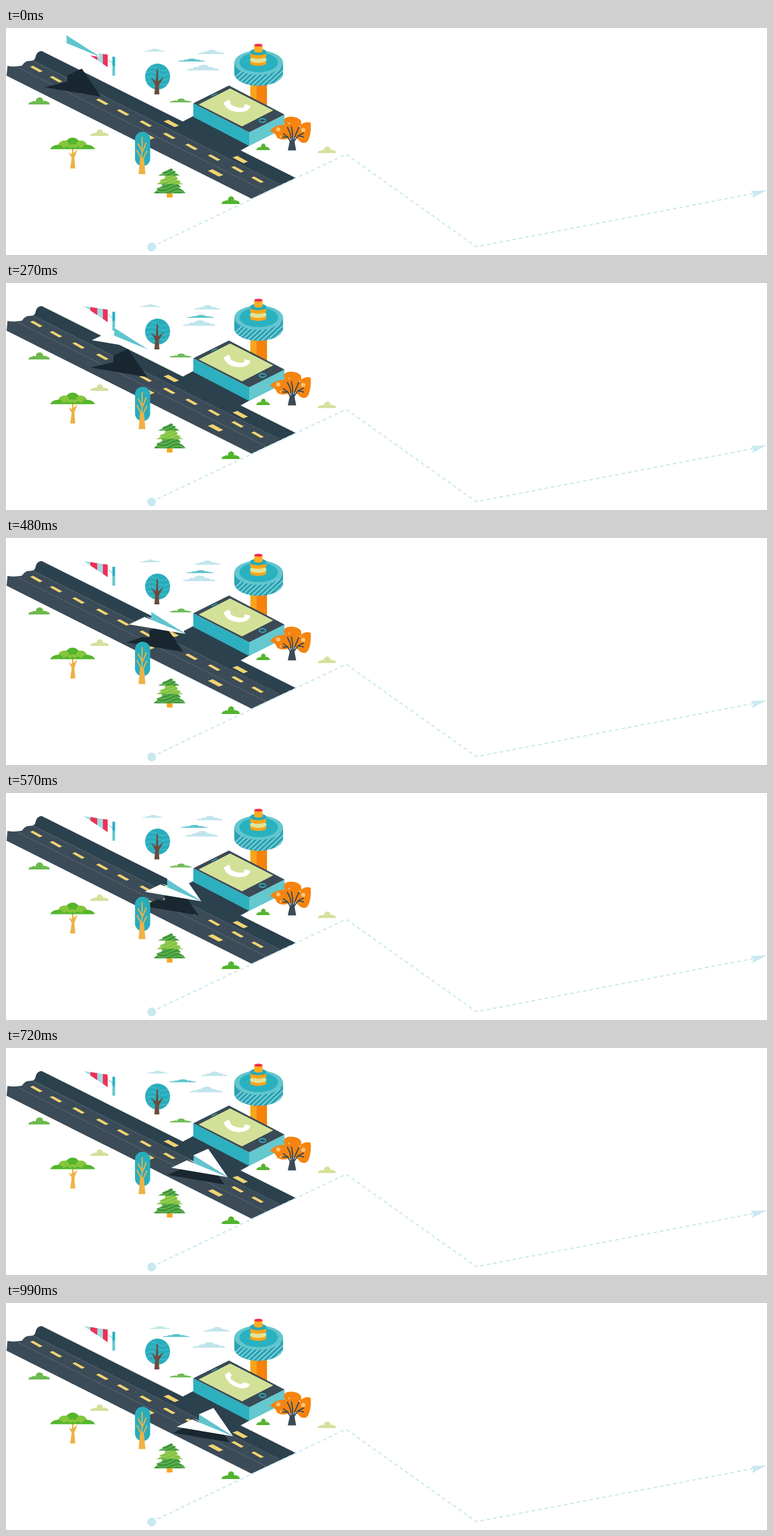
Recreate the animation shown at these times as an HTML page. Size 1280x383 px, loop 1.02 s.

```html
<!DOCTYPE html>
<html lang="en">
<head>
<meta charset="utf-8">
<title>Landing</title>
<style>
html, body { margin: 0; width: 100%; height: 100%; overflow: hidden; background: #fff; }
svg { display: block; width: 1280px; height: 383px; }
</style>
</head>
<body>
<svg viewBox="0 0 1280 383">
  <defs>
    <clipPath id="saucer"><path d="M384 58V77A41 20.5 0 0 0 466 77V58A41 20.5 0 0 1 384 58Z"/></clipPath>
    <clipPath id="phoneSide"><path d="M315 127L409 176V199L315 150Z"/></clipPath>
    <clipPath id="ball"><ellipse cx="255" cy="82" rx="21" ry="22"/></clipPath>
    <clipPath id="pine"><path d="M277 237L292 249H256ZM268 249H285L299 263H253ZM262 263H289L302 279H248Z"/></clipPath>
  </defs>

  <!-- windsock -->
  <g>
    <path d="M171 53L180 60M176 57L180 59" stroke="#64c8cf" fill="none"/>
    <path d="M131 39L171 45V66Z" fill="#9fdbe2"/>
    <path d="M142 40.6L153.5 42.4V54.3L142 46.5ZM163 43.8L171 45V66L163 60.5Z" fill="#ef3158"/>
    <path d="M179 48.5H183.5V64H179Z" fill="#2ab1c0"/>
    <path d="M179 64H183.5V80.5H179Z" fill="#64c8cf"/>
  </g>

  <g id="clouds"></g>

  <!-- round tree -->
  <ellipse cx="255" cy="82" rx="21" ry="22" fill="#28adbd"/>
  <g id="ballLines" clip-path="url(#ball)" fill="none" stroke="#5fc6d0" stroke-width=".9"></g>
  <path d="M249.5 112L251 96L244 84L252 90L253.5 69L255.5 69L256 90L265 83L257 97L258 112Z" fill="#6b4c3f"/>

  <g id="bushes"></g>

  <!-- flat tree -->
  <path d="M108 237L110.5 219L105.5 210L111 213L111 204H113.5V211L120 205L115 219L116.5 237Z" fill="#eeb144"/>
  <path d="M74 204.5Q78 197 88 197Q91 189 102 190Q106 185 112 185Q118 185 122 190Q133 189 136 197Q146 197 150 204.5Z" fill="#55b52c"/>
  <path d="M88 197Q91 189 101 190Q107 193 106 198Q112 194 118 198Q117 193 123 190Q133 189 136 197Q130 197 127 203Q121 197 116 203Q112 198 108 203Q103 197 97 203Q94 197 88 197Z" fill="#86c63c"/>
  <path d="M105 192Q107 185 112 185Q117 185 119 192Q115 196 112 193Q109 196 105 192Z" fill="#55b52c"/>

  <!-- pine -->
  <path d="M270.5 278H280V286H270.5Z" fill="#f5a623"/>
  <path d="M277 237L281 238L280 240.5L286 242L284 244L292 249H256L264 245L262 244L272 240Z" fill="#3f9a37"/>
  <path d="M268 249H285L289 254L287 256L294 259L292 261L299 263.5H253L261 259L258 257L267 254Z" fill="#85c440"/>
  <path d="M262 263H289L294 268L291 270L298 274L302 279H248L255 273L253 271L263 267Z" fill="#3f9a37"/>
  <g id="pineLines" clip-path="url(#pine)" fill="none" stroke="#b5dba0" stroke-width=".7"></g>

  <!-- road -->
  <path d="M1 80.5L2.5 64Q14 66 27 63.5Q32 55 40 55.5Q49 56 50 48Q52 39.5 60 39L487 253L413 288Z" fill="#3b4b57"/>
  <path d="M46 55Q50 53 50 48Q52 39.5 60 39L487 253L461 265Z" fill="#2c414e"/>
  <path d="M297 158L318 147L410 198L392 208Z" fill="#2c414e"/>
  <path d="M47 56L461 264M21 67L438 276" stroke="#98a1a6" stroke-width=".8" stroke-dasharray="1.6 1.8"/>
  <g id="marks" fill="#f0d372"></g>

  <!-- route -->
  <path d="M245 369L572 213L791 369L1256 279.5" fill="none" stroke="#c5e8ee" stroke-width="2" stroke-dasharray="6 5"/>
  <circle cx="245" cy="369.5" r="7.5" fill="#c9e9f0"/>
  <path d="M1253 275L1279 274L1255 287L1257 280Z" fill="#c9e9f0"/>

  <!-- tower -->
  <path d="M411 88H422V132H411Z" fill="#f9a51a"/>
  <path d="M421.5 88H439V132H421.5Z" fill="#f5820d"/>
  <path d="M384 58V77A41 20.5 0 0 0 466 77V58Z" fill="#2aa3b5"/>
  <g id="saucerLines" clip-path="url(#saucer)" stroke="#8fd6dc" stroke-width="1.8"></g>
  <ellipse cx="425" cy="58.5" rx="41" ry="20.5" fill="#62c6ce"/>
  <ellipse cx="425" cy="58" rx="32.5" ry="16.5" fill="#2ab1c0"/>
  <g id="drums"></g>
  <path d="M417.5 29V39A7 2.5 0 0 0 431.5 39V29Z" fill="#fbb020"/>
  <ellipse cx="424.5" cy="29" rx="7" ry="2.6" fill="#ee2f55"/>

  <!-- phone -->
  <path d="M315 127L409 176V199L315 150Z" fill="#2fb3c2"/>
  <g id="phoneLines" clip-path="url(#phoneSide)" stroke="#27a6b6" stroke-width=".7"></g>
  <path d="M409 176L468.5 146V169L409 199Z" fill="#64c8cf"/>
  <path d="M315 127L375 97L468.5 146L409 176Z" fill="#3a4a56"/>
  <path d="M324 129L377 102L449.5 139L397 166Z" fill="#d3e198"/>
  <path d="M345.5 115L355 110.3" stroke="#2ab1c1" stroke-width="1.5"/>
  <ellipse cx="431.5" cy="156" rx="5.5" ry="3" fill="none" stroke="#2fb3c3" stroke-width="1.8"/>
  <path id="handset" fill="#fff"/>

  <!-- orange tree -->
  <path d="M444 174Q452 163 469 163Q464 153 474 150Q488 148 496 156L497 163Q503 157 512.5 160Q514 178 508 190Q503 197 495 192L487 184L474 187Q463 190 456 185Q454 177 444 174Z" fill="#f58410"/>
  <g id="fruit" fill="#fbc478"></g>
  <path d="M474 206.5L477.5 190H485L488 206.5Z" fill="#3a4a56"/>
  <path d="M479 193L474 184L466 178M474 184L465 184M480 191L478 177L473 167M482 191L482 177L480 166M483 191L488 178L493 167M484 192L491 182L501 177M491 182L501 184" fill="none" stroke="#3a4a56" stroke-width="2"/>

  <path id="shadow" fill="#182730"/>

  <!-- tall tree -->
  <rect x="217" y="175" width="25.5" height="58" rx="12.7" fill="#28adbd"/>
  <path d="M223 246.5L225.5 219H232L234.5 246.5Z" fill="#eeb144"/>
  <path d="M228.500 222L229 184M228 221L220 206M229 208L222 195M230 222L237 207M229.500 209L236 193" fill="none" stroke="#eeb144" stroke-width="2"/>

  <g id="plane">
    <path d="M-33 -48L0 0L-58 -37Z" fill="#fff"/>
    <path d="M-57.5 -37L0 0L-57.500 -22Z" fill="#60c5ce"/>
    <path d="M-95 -16L-69 -28.5L0 0Z" fill="#fff"/>
    <path d="M-67 -30L-57 -26.5V-24.5Z" fill="#d5eff2"/>
  </g>
</svg>
<script>
const LOOP = 1020, LANDED = 750, TURN = 360;
const $ = id => document.getElementById(id);
const range = (n, f) => Array.from({ length: n }, (_, i) => f(i)).join('');
const clamp = v => Math.max(0, Math.min(1, v));
const mix = (a, b, k) => a + (b - a) * k;
const smooth = k => (1 - Math.cos(Math.PI * clamp(k))) / 2;

function puff(shape, x, y, w, h, color) {
  const d = shape.replace(/(\d*\.?\d+) (\d*\.?\d+)/g, (_, a, b) => `${(x + a * w).toFixed(2)} ${(y + b * h).toFixed(2)}`);
  return `<path d="${d}" fill="${color}"/>`;
}

const cloud = 'M0 1Q.05 .62 .2 .68Q.22 .3 .33 .45Q.4 0 .53 0Q.66 .05 .69 .45Q.8 .3 .84 .68Q.97 .6 1 1Z';
const bush = 'M0 1Q.04 .6 .18 .62Q.26 .4 .34 .6Q.36 0 .54 0Q.7 .05 .7 .55Q.78 .4 .86 .6Q1 .6 1 1Z';

$('clouds').innerHTML = [
  [303.5, 62, 56, 9.5, '#c1e5ec'],
  [322.5, 36.5, 45, 7.5, '#c1e5ec'],
  [231, 35, 36.5, 4.7, '#c1e5ec'],
  [289, 51.5, 46, 5, '#5cc4cd']
].map(c => puff(cloud, ...c)).join('');

$('bushes').innerHTML = [
  [37.5, 117, 36, 12, '#6cb94e'],
  [141.5, 171, 31, 11, '#d3e09b'],
  [275, 119, 37, 6.5, '#6dbb54'],
  [421, 195, 22.5, 11, '#55b431'],
  [362.5, 284, 30.5, 13, '#4fb52d'],
  [524, 200, 31, 11, '#d4e19d']
].map(b => puff(bush, ...b)).join('');

const mark = (x, y, shape) => `<path d="${shape}" transform="translate(${x} ${y})"/>`;
const small = 'M-10.7 -3.6L-5.5 -5.5L10.7 3.6L5.5 5.5Z';
const large = 'M-13 -3.5L-5 -6.3L13 3.5L5.5 6.3Z';
$('marks').innerHTML =
  [[51, 69.2], [84, 86.4], [122, 105.4], [162, 124.5], [197, 142.5], [235, 161.5], [274.5, 182], [312, 200.5], [350, 218.7], [389.5, 238.5], [423, 256]]
    .map(p => mark(...p, small)).join('') +
  [[278, 161], [394, 222], [352.5, 244.5], [237, 182]].map(p => mark(...p, large)).join('');

const line = (x1, y1, x2, y2) => `<line x1="${x1}" y1="${y1}" x2="${x2}" y2="${y2}"/>`;
$('saucerLines').innerHTML = range(14, i => line(368 + i * 8.5, 100, 402 + i * 8.5, 68));
$('phoneLines').innerHTML = range(8, i => line(315, 129.5 + i * 2.8, 409, 178.5 + i * 2.8));
$('ballLines').innerHTML = range(5, i => `<path d="M232 ${70 + i * 8}Q244 ${62 + i * 8} 255 ${69 + i * 8}T279 ${66 + i * 8}"/>`);
$('pineLines').innerHTML = range(7, i => `<path d="M246 ${240 + i * 6}Q262 ${253 + i * 6} 277 ${243 + i * 6}T304 ${246 + i * 6}"/>`);
$('drums').innerHTML = [[59, '#f9a51a'], [54, '#dfe49b'], [47, '#f9a51a'], [41, '#2aa9b8']]
  .map(([y, color]) => `<path d="M410.5 ${y - 1}A13.7 5 0 0 1 438 ${y - 1}V${y}A13.7 5 0 0 1 410.5 ${y}Z" fill="${color}"/>`).join('');
$('fruit').innerHTML = [[458, 171, 3.5], [500, 172, 3.5], [476, 161, 1.5], [462, 183, 1.5], [494, 166, 1.5], [496, 184, 1.5], [468, 184, 1.2]]
  .map(([x, y, r]) => `<circle cx="${x}" cy="${y}" r="${r}"/>`).join('');

// Handset outline at rest and while ringing
const rest = [366, 126, 374, 121, 378, 125, 377, 128, 387, 136, 400, 134, 402, 128.5, 411, 131, 409, 142, 391, 142, 372, 141];
const ring = [368, 121, 375, 116, 380, 122, 377, 126, 384, 135, 396, 137, 400, 133.5, 410, 137, 408, 144, 398, 144, 374, 141];

function draw(now) {
  const t = now % LOOP;
  const flight = clamp(t / LANDED);
  $('plane').setAttribute('transform', `translate(${mix(159.3, 382, flight)} ${mix(49.2, 225, flight)})`);

  const fold = clamp((t - TURN) / 270);
  $('shadow').setAttribute('d', `M-95 -16L-69 ${mix(-22.6, -28.5, fold)}L-57 ${mix(-25.5, -23.5, fold)}V-36L-32.5 -47.5L0 0Z`);
  $('shadow').setAttribute('transform', `translate(${mix(160, 376, flight)} ${mix(116, 235, flight)})`);

  // Clouds drift one way, then ease back past where they began
  const out = clamp(t / TURN), back = smooth((t - TURN) / 530);
  const sway = (far, end) => mix(far * out, end, back);
  const pale = `translate(${sway(-9, 9.5)} ${sway(1, 4)})`;
  const teal = `translate(${sway(20, -26)} ${sway(3, 0.7)})`;
  [...$('clouds').children].forEach((c, i) => c.setAttribute('transform', i === 3 ? teal : pale));

  const k = smooth((t - LANDED) / 210);
  const p = rest.map((v, i) => mix(v, ring[i], k));
  const at = i => `${p[2 * i]} ${p[2 * i + 1]}`;
  $('handset').setAttribute('d',
    `M${at(0)}L${at(1)}L${at(2)}L${at(3)}Q${at(4)} ${at(5)}L${at(6)}L${at(7)}Q${at(8)} ${at(9)}Q${at(10)} ${at(0)}Z`);
}

let start;
function tick(now) {
  start ??= now;
  draw(now - start);
  requestAnimationFrame(tick);
}
draw(0);
requestAnimationFrame(tick);
</script>
</body>
</html>
```
